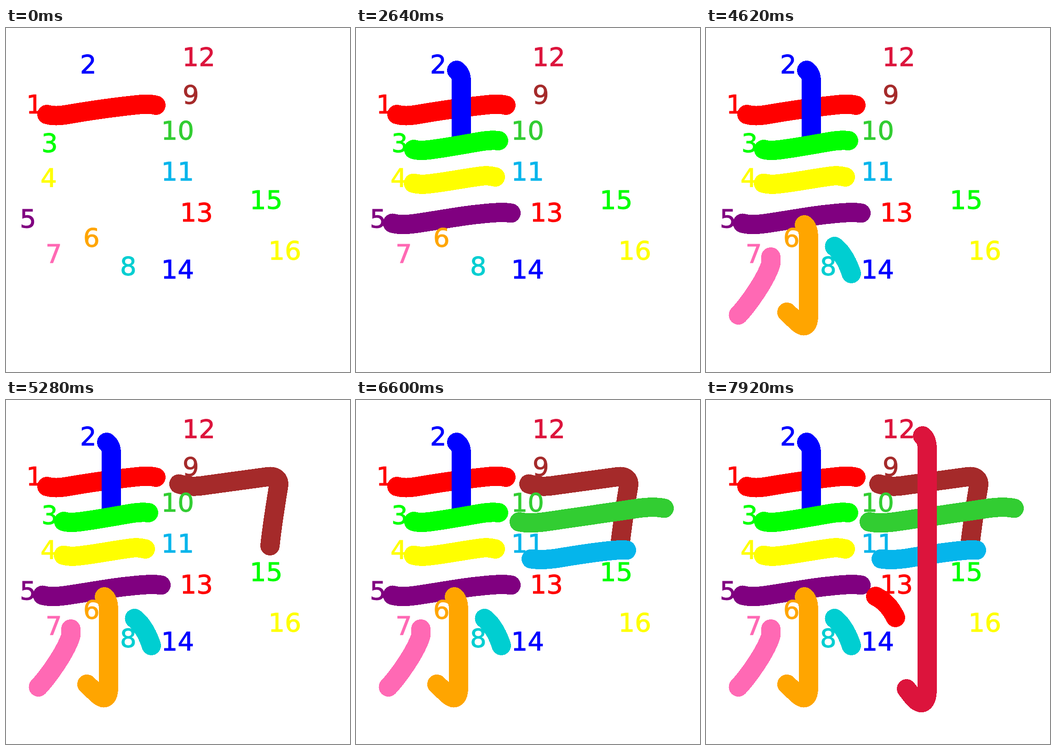
An HTML page that plays this animation: 748x748 px, repeating every 8000 ms.

```html
<!DOCTYPE html>
<html lang="en">
<head>
<meta charset="utf-8">
<title>Stroke order</title>
<style>
  @property --step { syntax: "<number>"; inherits: true; initial-value: 0; }
  /* one stroke every 660 ms within an 8000 ms loop */
  @keyframes count { from { --step: 0; } to { --step: 12.121212; } }
  html, body { margin: 0; width: 100%; height: 100%; overflow: hidden; background: #fff; }
  svg { display: block; width: 100%; height: 100%; }
  #strokes {
    fill: none; stroke-width: 42; stroke-linecap: round; stroke-linejoin: round;
    shape-rendering: crispEdges;
    animation: count 8s linear infinite;
  }
  #strokes path { opacity: clamp(0, (var(--step) - var(--i)) * 9999 + 2, 1); }
  #labels { font: 56px Verdana, "DejaVu Sans", sans-serif; stroke-width: 1.1; }
</style>
</head>
<body>
<svg viewBox="0 0 748 748">
  <g id="strokes"></g>
  <g id="labels"></g>
</svg>
<script>
  // colour, label x, label baseline, stroke path
  const strokes = [
    ["red", 44, 185, "M89 188C103 192 118 191 134 188Q215 174 290 166.5Q313 164.5 326 168"],
    ["blue", 161, 98, "M219 92C225 97 229 105 229 115V246"],
    ["lime", 77, 269, "M125.5 264C140 268 155 265.5 170 263.5C210 258 245 251 270 247C290 243.5 301 244 310 245"],
    ["yellow", 75, 345, "M125 337.5C140 341.5 155 339.5 170 337.5C205 333 235 327 262 323.5C282 320 291 321 303 324"],
    ["purple", 30, 434, "M79.5 424.5C94 429 112 427.5 130 425C180 418 230 408 270 404.5Q317 399 337 402.5"],
    ["orange", 168, 475, "M214 428Q223 435 223 456V625C223 648 214 654 198 639L176 618"],
    ["hotpink", 86, 510, "M141 498C141.5 512 141 514 138 521C126 552 94 599 70.5 624"],
    ["darkturquoise", 248, 537, "M279.5 475Q303 494 316 534"],
    ["brown", 384, 164, "M376 182.5C392 187.5 408 189 425 186.5L568 167C585 164.5 595 172 592.5 188C585 235 579 270 574 317"],
    ["limegreen", 337.5, 242, "M355 265C372 268.5 390 267.5 410 265L600 237.5Q645 230 670 235.5"],
    ["#05b5eb", 337.5, 331, "M381 345.5C400 348 415 347.5 435 344.5Q515 331 560 327Q575 325.5 588 326.5"],
    ["crimson", 383.5, 82, "M471 78Q481 86 481 108V628C481 657 470 669 450 646L436 628"],
    ["red", 378.5, 420, "M369 427Q396 440 412 473"],
    ["blue", 337.5, 544],
    ["lime", 530, 393],
    ["yellow", 570.5, 503]
  ];

  const add = (id, tag, attrs, text = "") => {
    const el = document.createElementNS("http://www.w3.org/2000/svg", tag);
    for (const key in attrs) el.setAttribute(key, attrs[key]);
    el.textContent = text;
    document.getElementById(id).append(el);
  };

  strokes.forEach(([color, x, y, d], i) => {
    if (d) add("strokes", "path", { d, stroke: color, style: `--i:${i}` });
    add("labels", "text", { x, y, fill: color, stroke: color }, i + 1);
  });
</script>
</body>
</html>
```
